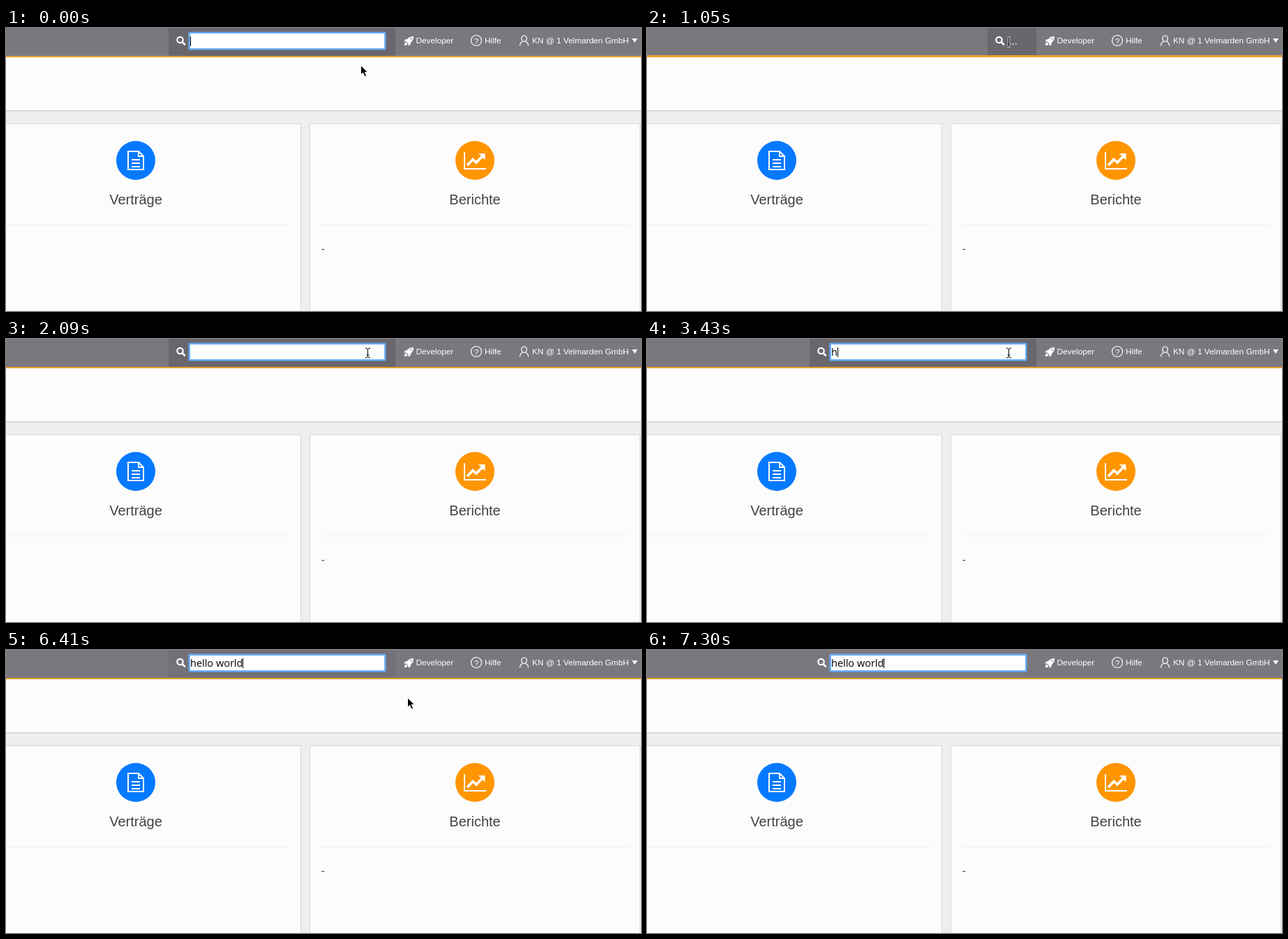
An HTML page that plays this animation: 910x406 px, repeating every 7600 ms.

```html
<!DOCTYPE html>
<html lang="de">
<head>
<meta charset="utf-8">
<title>Suche</title>
<style>
html, body { margin: 0; width: 100%; height: 100%; overflow: hidden; background: #eee; }
svg { display: block; width: 910px; height: 406px; }
text { white-space: pre; }
.nav { font: 11.8px "Liberation Sans", Arial, sans-serif; fill: #fff; }
.title { font: 20px "Liberation Sans", Arial, sans-serif; fill: #424242; text-anchor: middle; }
.note { font: 16px "Liberation Sans", Arial, sans-serif; fill: #555; }
.field { font: 14.5px "Open Sans", "Noto Sans", sans-serif; }
.card { fill: #fcfcfc; stroke: #d9d9d9; }
.rule { stroke: #eee; }
.line { fill: none; stroke: #fff; }
</style>
</head>
<body>
<svg viewBox="0 0 910 406">
  <rect width="910" height="118" fill="#fdfdfd"/>
  <rect y="118" width="910" height="1" fill="#cfcfcf"/>
  <rect y="119" width="910" height="1" fill="#e5e5e5"/>

  <g>
    <rect class="card" x="-20.5" y="137.5" width="443" height="320"/>
    <circle cx="186" cy="190" r="28" fill="#0579ff"/>
    <path class="line" stroke-width="2" d="M175 177H190L197 184V203H175ZM190 177V184H197M180 189H192M180 194H192M180 199H192"/>
    <text class="title" x="186" y="253">Verträge</text>
    <path class="rule" d="M0 282.5H406"/>
  </g>

  <g id="reports">
    <rect class="card" x="435.5" y="137.5" width="473" height="320"/>
    <circle cx="672" cy="190" r="28" fill="#ff9500"/>
    <path class="line" stroke-width="2" d="M657 178V202H688"/>
    <path class="line" stroke-width="3.6" d="M661 197L669 188.500L674 193L683 183.500"/>
    <path fill="#fff" d="M677 180H686.500V189.500Z"/>
    <text class="title" x="672" y="253">Berichte</text>
    <path class="rule" d="M452 282.500H892"/>
    <text class="note" x="451.500" y="322">-</text>
  </g>

  <rect id="accent" y="39" width="910" height="3" fill="#e9a12b"/>
  <rect id="header" width="910" height="40" fill="#7a787f"/>
  <rect id="bar" height="40" fill="#69676d"/>

  <g class="nav">
    <path fill="#fff" d="M584 12Q578 12 575 16L572 16.500L570.500 19.500L573.500 19.500L576.500 22.500V25.500L579.500 24L580 21Q584 18 584 12ZM573 20.500Q570.500 21.500 571 25Q574.500 25.500 575.500 23Z"/>
    <circle cx="580.500" cy="15.500" r="1" fill="#7a787f"/>
    <text x="587.500" y="22">Developer</text>
    <circle class="line" cx="674" cy="18" r="7.500" stroke-width="1.200"/>
    <text x="674" y="22.500" text-anchor="middle">?</text>
    <text x="686" y="22">Hilfe</text>
    <path class="line" stroke-width="1.200" d="M742.500 11C737 11 738 19 742.500 19.500C747 19 748 11 742.500 11ZM736.500 25.500Q736.500 20.500 740.500 19.500M748.500 25.500Q748.500 20.500 744.500 19.500"/>
    <text x="754" y="22">KN @ 1 Velmarden GmbH</text>
    <path fill="#fff" d="M897 15H905L901 21Z"/>
  </g>

  <g id="lens" class="line">
    <circle cx="16.500" cy="17" r="4.200" stroke-width="2.200"/>
    <path stroke-width="2.600" stroke-linecap="round" d="M20 20.500L23 23.500"/>
  </g>
  <rect id="glow" y="6.500" height="24" rx="1.500" fill="none" stroke="#64aefc" stroke-opacity=".5" stroke-width="3"/>
  <rect id="box" y="7" height="23" fill="#fff"/>
  <rect id="ring" y="7" height="23" fill="none" stroke="#64aefc" stroke-width="1.800"/>
  <text id="dots" class="field" y="24" fill="#fff">...</text>
  <text id="query" class="field" x="264" y="24"></text>
  <rect id="caret" y="12" width="1" height="14"/>

  <g id="arrow">
    <path stroke="#fff" d="M0.500 0.500V14L3.500 11.300L6 16.800L8.600 15.700L6.200 10.300H10.300Z"/>
  </g>
  <g id="beam" fill="none">
    <path id="stem" stroke="#fff" stroke-opacity=".45" stroke-width="2.600" d="M-3 -7Q0 -7 0.500 -5Q1 -7 4 -7M0.500 -5V5M-3 7Q0 7 0.500 5Q1 7 4 7M-1.500 3H2.500"/>
    <use href="#stem"/>
    <path stroke="#000" d="M-3 -7Q0 -7 0.500 -5Q1 -7 4 -7M0.500 -5V5M-3 7Q0 7 0.500 5Q1 7 4 7M-1.500 3H2.500"/>
  </g>
  <g id="hand" stroke="#000" stroke-linejoin="round">
    <path fill="#fff" stroke-width="1.200" d="M-2.500 8.500V6L-6 1Q-6.500 -1 -4.500 -1L-2.500 1L-4 -6.500Q-4 -8.500 -2.500 -8.500Q-1.200 -8.500 -0.800 -6.500L0.300 -2.500Q2 -4 3.200 -2Q5 -3 5.900 -1Q8.300 -1.500 8.300 1.500L7.500 5L6.500 8.500Z"/>
    <path d="M0.500 2V5.500M3 2V5.500M5.500 2V5.500"/>
  </g>
</svg>
<script>
const LOOP = 7600;
const el = id => document.getElementById(id);
const set = (id, attrs) => {
  for (const name in attrs) el(id).setAttribute(name, attrs[name]);
};
const show = (id, on) => { el(id).style.display = on ? "" : "none"; };

// Tracks hold each value until the next time.
const hold = (track, t) => track.findLast(key => key[0] <= t);

const opening = [[0, 1], [450, .87], [600, .2], [750, .01], [900, 0],
  [1490, .13], [1640, .796], [1790, .99], [1940, 1]];
const hover = [[0, 1], [6410, .4], [6560, 0]];
const lift = [[0, 0], [6560, 2], [6700, 6], [7150, 2], [7300, 0]];
const blink = [[0, true], [450, false], [1490, true], [2090, false], [2380, true],
  [2980, false], [3430, true], [5810, false], [6260, true]];
const pointer = [[0, "arrow", 508, 53], [150, "arrow", 508, 77],
  [750, "arrow", 511, 60], [900, "beam", 517, 29], [1050, "beam", 518, 20],
  [6410, "arrow", 575, 68], [6560, "hand", 690, 182], [6700, "hand", 787, 277],
  [6850, "hand", 830, 345], [7000, "hand", 850, 392], [7150, "none", 0, 0]];

function typed(t) {
  const count = (start, step, max) =>
    Math.max(0, Math.min(max, Math.floor((t - start) / step) + 1));
  return "hello world".slice(0, count(3430, 150, 5) + count(4480, 146, 6));
}

function draw(t) {
  const open = hold(opening, t)[1];
  const focused = t < 450 || t >= 1490;
  const left = Math.round(488 - 255 * open);
  const input = left + 30;
  const width = 543 - input;
  const height = focused ? 40 : 39;

  set("header", { height });
  set("bar", { x: left, width: 558 - left, height, opacity: hold(hover, t)[1] });
  set("lens", { transform: `translate(${left})` });
  set("box", { x: input, width, opacity: open });
  set("ring", { x: input, width });
  set("glow", { x: input - .5, width: width + 1 });
  set("dots", { x: input + 1, opacity: 1 - open });
  for (const id of ["ring", "glow"]) show(id, focused);
  show("dots", !focused);

  const query = el("query");
  query.textContent = typed(t);
  const end = query.textContent ? query.getComputedTextLength() : 0;
  set("caret", { x: Math.round(input + 1 + end) });
  show("caret", hold(blink, t)[1]);

  set("reports", { transform: `translate(0 ${-hold(lift, t)[1]})` });

  const [, kind, x, y] = hold(pointer, t);
  for (const id of ["arrow", "beam", "hand"]) show(id, id === kind);
  if (kind !== "none") set(kind, { transform: `translate(${x} ${y})` });
}

function tick() {
  draw(performance.now() % LOOP);
  requestAnimationFrame(tick);
}
tick();
</script>
</body>
</html>
```
